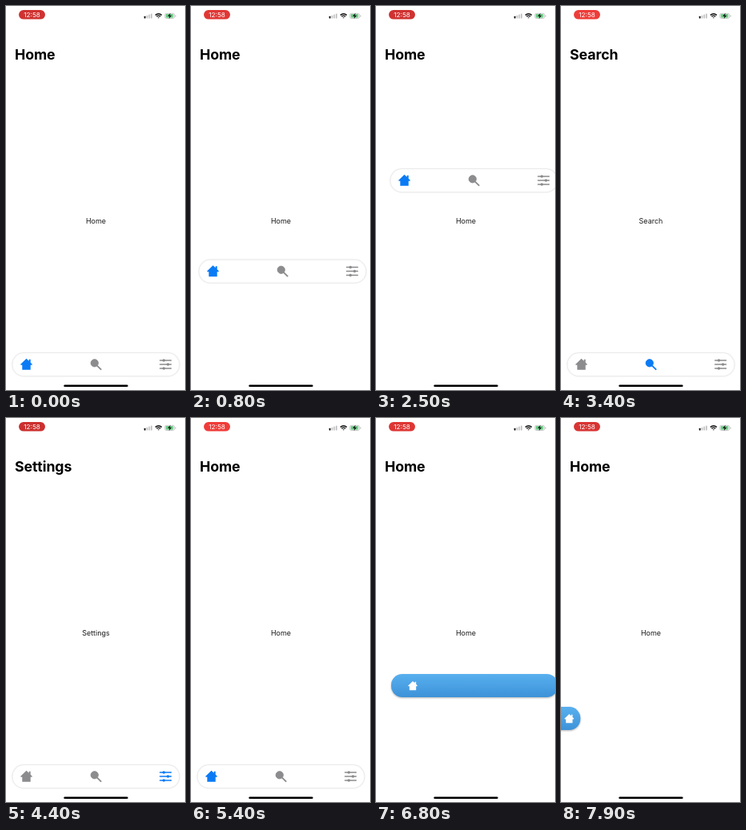
Animation, 224 px wide and 480 px high, one loop 8000 ms. Source, as an HTML page:

```html
<!DOCTYPE html>
<html lang="en">
<head>
<meta charset="utf-8">
<title>Floating tab bar</title>
<style>
  html, body { margin: 0; width: 100%; height: 100%; overflow: hidden; background: #fff; }
  svg { display: block; width: 100vw; height: 100vh; font-family: Inter, Roboto, sans-serif; }
  .tab { color: #8c8c8e; }
  .tab.active { color: #0a7bf5; }
  #bar > rect { fill: #fff; filter: drop-shadow(0 .8px .8px rgba(0, 0, 0, .24)); }
  #mini > rect { fill: url(#sky); filter: drop-shadow(0 1px 1px rgba(0, 0, 0, .3)); }
  #mini { color: #fff; }
</style>
</head>
<body>
<svg viewBox="0 0 224 480">
  <defs>
    <linearGradient id="sky" x2="0" y2="1">
      <stop stop-color="#58b0ef"/>
      <stop offset="1" stop-color="#3d92d8"/>
    </linearGradient>
    <path id="house" fill="currentColor" d="M0-7.2 3.2-4.2V-6.2H5.2V-2.3L7.5 0 6.8.8H5.2V6.8H-5.2V.8H-6.8L-7.5 0Z"/>
    <g id="lens" fill="currentColor" stroke="currentColor">
      <circle cx="-1.7" cy="-1.7" r="4.6"/>
      <path d="M1.8 1.8 6.2 6.2" stroke-width="1.9" stroke-linecap="round"/>
    </g>
    <g id="sliders" fill="currentColor" stroke="currentColor" stroke-width="1.3" stroke-linecap="round">
      <path d="M-7-5H7M-7 0H7M-7 5H7"/>
      <g stroke="none">
        <circle cx="-2.2" cy="-5" r="1.7"/>
        <circle cx="3" r="1.7"/>
        <circle cx="-2.2" cy="5" r="1.7"/>
      </g>
    </g>
  </defs>

  <rect width="224" height="480" fill="#fff"/>

  <rect id="pill" x="16" y="5" width="33" height="11.6" rx="5.8"/>
  <text x="32.6" y="13.7" font-size="8.2" text-anchor="middle" fill="#fff">12:58</text>
  <g fill="#c4c4c6">
    <rect x="172.8" y="12.8" width="1.8" height="2.6" rx=".5" fill="#111"/>
    <rect x="175.6" y="11.8" width="1.8" height="3.6" rx=".5"/>
    <rect x="178.4" y="10.6" width="1.8" height="4.8" rx=".5"/>
    <rect x="181.2" y="9.4" width="1.8" height="6" rx=".5"/>
  </g>
  <g fill="none" stroke="#111" stroke-width="1.4">
    <path d="M186.9 11.4Q190.9 7.9 194.9 11.4M188.5 13.1Q190.9 11.1 193.3 13.1"/>
    <path d="M189.7 14.2H192.1L190.9 15.4Z" fill="#111" stroke="none"/>
  </g>
  <rect x="198.8" y="9.3" width="12" height="6.2" rx="2" fill="#fff" stroke="#a8a8a8" stroke-width=".6"/>
  <rect x="199.8" y="10.1" width="9.6" height="4.6" rx="1.1" fill="#72cf8b"/>
  <path d="M205.8 8.8 202.2 12.8H204.6L203.8 16 207.4 11.8H205Z" fill="#111"/>
  <rect x="211.6" y="11.4" width=".9" height="2.2" rx=".4" fill="#a8a8a8"/>

  <text id="title" x="11" y="66.8" font-size="17.8" font-weight="700" letter-spacing="-.1">Home</text>
  <text id="label" x="112.5" y="272.2" font-size="9" text-anchor="middle" fill="#1c1c1e">Home</text>

  <g id="bar">
    <rect x="8.3" y="434" width="208.4" height="28.3" rx="14.1"/>
    <use class="tab" href="#house" x="25.5" y="448"/>
    <use class="tab" href="#lens" x="112.5" y="448"/>
    <use class="tab" href="#sliders" x="199.7" y="448"/>
  </g>
  <g id="mini">
    <rect y="-14.5" height="29" rx="14"/>
    <use href="#house" transform="scale(.8)"/>
  </g>

  <rect x="72.3" y="473.4" width="80.4" height="2.6" rx="1.3" fill="#000"/>
</svg>
<script>
  const LOOP = 8000, STEP = 100;
  const MINI_FROM = 6400;
  const byId = id => document.getElementById(id);
  const [pill, title, label, bar, mini] = ['pill', 'title', 'label', 'bar', 'mini'].map(byId);
  const tabs = document.querySelectorAll('.tab');
  const [miniBody, miniIcon] = mini.children;

  const pages = ['Home', 'Search', 'Settings'];
  const visits = [[0, 0], [3400, 1], [4400, 2], [4900, 0]];

  // time, dx, dy of the dragged bar
  const drag = [
    [200, 0, 0], [800, 2, -116.5], [1100, 0, 0], [1200, 0, 0],
    [1900, 10.5, -242.5], [2300, 12, -255], [2500, 10, -230], [2900, 0, 0],
    [5400, 0, 0], [6200, 10, -112], [6400, 11, -113.5]
  ];
  // time, left, right, icon x, centre y of the docked shape
  const dock = [
    [6400, 19, 227.5, 46, 334.5], [6800, 19, 227.5, 46, 334.5], [7100, -26, 24.3, 10.3, 375.6]
  ];

  const mix = (a, b, k) => a + (b - a) * k;

  function sample(keys, t) {
    const next = keys.findIndex(key => key[0] > t);
    if (next === 0) return keys[0].slice(1);
    if (next < 0) return keys[keys.length - 1].slice(1);
    const from = keys[next - 1], to = keys[next];
    const k = (t - from[0]) / (to[0] - from[0]);
    const eased = k * k * (3 - 2 * k);
    return from.slice(1).map((v, i) => mix(v, to[i + 1], eased));
  }

  function draw(t) {
    const glow = (1 + Math.cos((t - 1250) / 2020 * 2 * Math.PI)) / 2;
    pill.setAttribute('fill', `rgb(${mix(202, 240, glow)}, ${mix(48, 60, glow)}, ${mix(47, 57, glow)})`);

    const page = visits.filter(([at]) => at <= t).pop()[1];
    title.textContent = label.textContent = pages[page];
    tabs.forEach((tab, i) => tab.classList.toggle('active', i === page));

    const docked = t >= MINI_FROM;
    bar.style.display = docked ? 'none' : '';
    mini.style.display = docked ? '' : 'none';
    bar.setAttribute('transform', `translate(${sample(drag, t)})`);

    const [left, right, iconX, y] = sample(dock, t);
    mini.setAttribute('transform', `translate(0 ${y})`);
    miniBody.setAttribute('x', left);
    miniBody.setAttribute('width', right - left);
    miniIcon.setAttribute('transform', `translate(${iconX} .2) scale(.8)`);
  }

  const start = performance.now();
  function tick() {
    const t = (performance.now() - start) % LOOP;
    draw(Math.floor(t / STEP) * STEP);
    requestAnimationFrame(tick);
  }
  tick();
</script>
</body>
</html>
```
